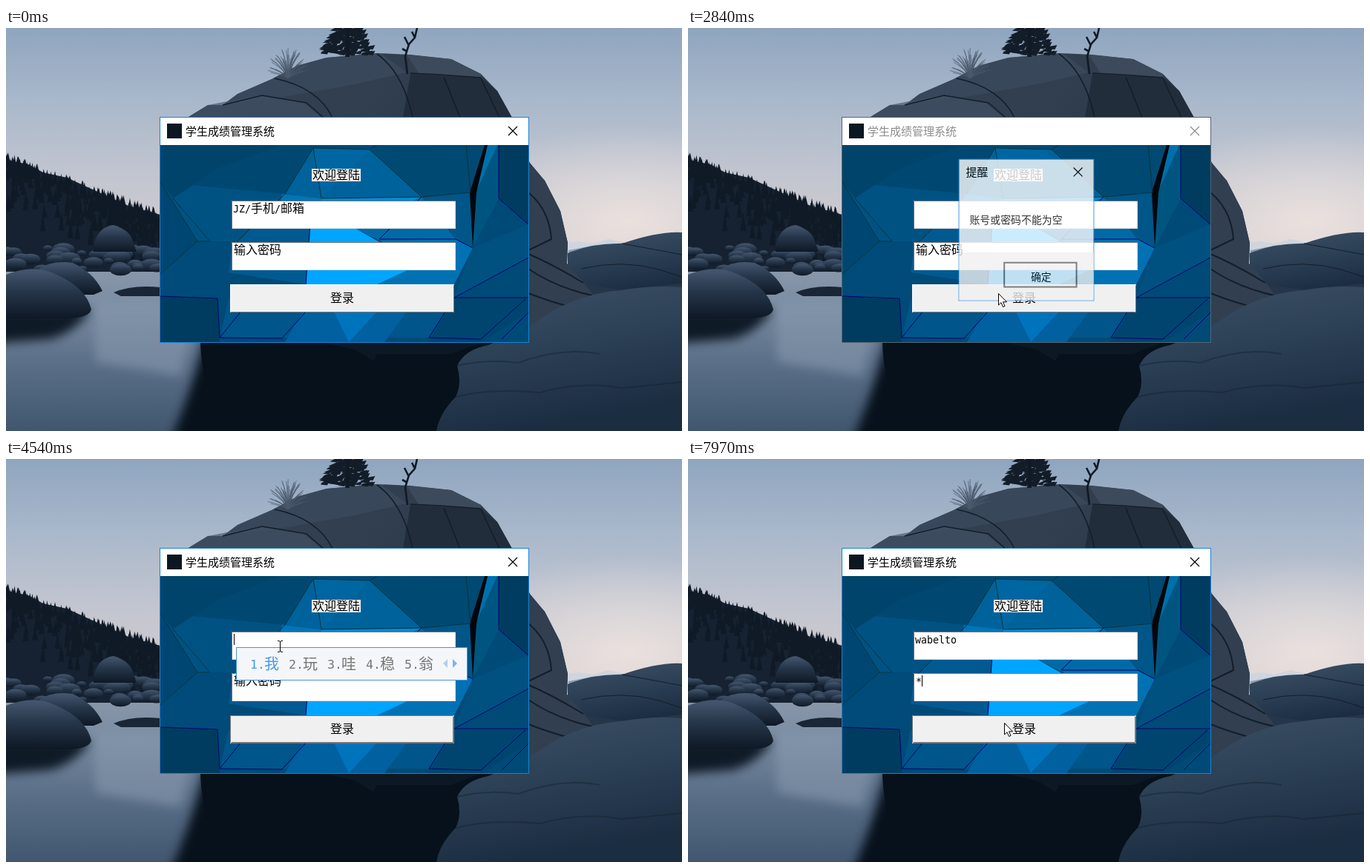
An HTML page for the animation above (8000 ms loop, 911 by 544 pixels).

```html
<!DOCTYPE html>
<html lang="zh-CN">
<head>
<meta charset="utf-8">
<style>
html, body { margin: 0; width: 100%; height: 100%; overflow: hidden; background: #0a1520; }
svg { display: block; }
text { font-family: "Noto Sans CJK SC", "Noto Sans CJK", sans-serif; white-space: pre; }
.cell { font-size: 16px; }
.mono { font-family: "DejaVu Sans Mono", monospace; font-size: 13.29px; }
.crack { fill: none; stroke: #131e2a; stroke-linejoin: round; }
.edge { fill: none; stroke: #00006e; stroke-width: 1; }
.dark { fill: none; stroke: #06343c; stroke-width: 1; }
</style>
</head>
<body>
<svg width="911" height="544" viewBox="0 0 911 544">
<defs>
  <linearGradient id="sky" x2="0" y2="1">
    <stop offset="0" stop-color="#8fa5bf"/><stop offset=".3" stop-color="#a9b8cb"/>
    <stop offset=".62" stop-color="#c3c6d0"/><stop offset="1" stop-color="#d6cccd"/>
  </linearGradient>
  <radialGradient id="dawn">
    <stop offset="0" stop-color="#f2e7e2" stop-opacity=".8"/><stop offset="1" stop-color="#f2e7e2" stop-opacity="0"/>
  </radialGradient>
  <linearGradient id="water" x2="0" y2="1">
    <stop offset="0" stop-color="#8896a9"/><stop offset=".2" stop-color="#7b8da3"/>
    <stop offset=".55" stop-color="#5c7089"/><stop offset="1" stop-color="#41566f"/>
  </linearGradient>
  <linearGradient id="rock" x2="1" y2=".6">
    <stop offset="0" stop-color="#344254"/><stop offset=".45" stop-color="#303e4f"/>
    <stop offset=".75" stop-color="#263342"/><stop offset="1" stop-color="#344356"/>
  </linearGradient>
  <linearGradient id="near" x2=".3" y2="1">
    <stop offset="0" stop-color="#3d5066"/><stop offset=".5" stop-color="#2c4056"/><stop offset="1" stop-color="#1b2d41"/>
  </linearGradient>
  <linearGradient id="shore" x2="0" y2="1">
    <stop offset="0" stop-color="#465870"/><stop offset=".45" stop-color="#26364a"/><stop offset="1" stop-color="#0e1825"/>
  </linearGradient>
  <filter id="soft" x="-30%" y="-30%" width="160%" height="160%" color-interpolation-filters="sRGB">
    <feGaussianBlur stdDeviation="7"/>
  </filter>
  <clipPath id="client"><rect x="208" y="158" width="496" height="266"/></clipPath>
</defs>

<!-- landscape -->
<rect width="911" height="330" fill="url(#sky)"/>
<ellipse cx="840" cy="260" rx="260" ry="130" fill="url(#dawn)"/>
<path d="M755,290L772,288L790,291L812,285L834,290V304H755Z" fill="#cfd5df"/>
<path d="M758,300L790,294L834,290V310H758Z" fill="#8a9cb4"/>
<path d="M757,304Q790,290 830,291Q880,274 911,276V360H757Z" fill="url(#near)"/>
<path d="M775,325Q830,312 880,326L911,336M830,291Q880,300 911,306" class="crack"/>
<path d="M780,345Q800,350 830,353L911,345V370H780Z" fill="#26364a"/>
<path d="M0,178L30,184L50,195L82,202L130,224L165,240L208,252V330H0Z" fill="#162231"/>
<path id="pines" fill="#101a27"/>
<rect y="329" width="640" height="215" fill="url(#water)"/>
<path d="M120,370H260L235,470L120,450Z" fill="#8799ae" opacity=".6" filter="url(#soft)"/>
<g id="stones" fill="url(#shore)"/>
<path d="M118,292Q125,268 145,266Q165,272 170,285L176,302H118Z" fill="url(#shore)"/>
<path d="M45,325Q62,313 90,317Q118,330 130,355L118,360H60Z" fill="url(#shore)"/>
<path d="M145,357Q170,346 208,350V362H155Z" fill="#1a2636"/>
<path d="M-20,380H114Q95,410 60,420L-20,426Z" fill="#0f1a27" filter="url(#soft)"/>
<path d="M0,333Q38,318 66,332Q108,350 115,380Q112,392 80,392H0Z" fill="url(#shore)"/>
<path d="M272,400H640V580H212Q252,490 272,400Z" fill="#07111b" filter="url(#soft)"/>
<path d="M262,422H660V470L600,520L585,544H290Q262,470 262,422Z" fill="#07111b"/>
<path d="M430,425H640L600,440H500L495,449L470,434Z" fill="#0c1824"/>
<path d="M208,140L246,120L272,104L292,104L312,89L358,69L392,51L432,40L500,34L545,36L600,42L640,62L662,85L682,121L706,182L726,206L747,247L757,290L756,318L778,343L792,362L770,378L704,402L640,425H262Z" fill="url(#rock)"/>
<path d="M292,104L312,89L358,69L392,51L432,40L505,34L540,60L470,76L380,92Z" fill="#3c4c60" opacity=".65"/>
<path d="M246,120L272,104L340,91L400,100L425,121Z" fill="#435266" opacity=".65"/>
<path d="M540,36L600,42L640,62V67L556,61Z" fill="#3c4a5b"/>
<path d="M545,62L640,67L662,85L682,121H535Z" fill="#212d3b"/>
<path d="M545,61L585,63L640,67M292,104L345,91L405,101L428,121M362,68Q420,80 440,121M500,35Q535,60 548,121M590,66L612,121M640,68L665,121" class="crack" stroke-width="1.6"/>
<path d="M704,182L726,206L747,247L757,290L756,318L778,343L792,362L770,378L704,402Z" fill="#313f51"/>
<path d="M704,222Q732,245 735,285L704,300M704,305Q735,318 778,344M704,325Q740,350 790,361M704,358Q740,372 768,378" class="crack" stroke-width="2"/>
<path d="M580,544Q584,520 606,498Q615,480 608,456Q618,434 650,428Q705,405 735,383Q780,357 830,354Q870,347 911,350V544Z" fill="url(#near)"/>
<path d="M608,456Q650,446 690,452Q750,430 800,440M606,498Q650,486 720,492Q780,476 830,486L911,478" class="crack" stroke-width="2" opacity=".4"/>
<path id="crown" fill="#121d29"/>
<path d="M457,39L459,0H462L463,39Z" fill="#101a25"/>
<path id="bush" fill="none" stroke="#4b5a6c" stroke-width=".7"/>
<path d="M541,62L538,38L543,22L551,13L554,0M543,24L537,12M541,32L534,28M551,13L547,5" fill="none" stroke="#101a26" stroke-width="2.6"/>

<!-- login window -->
<rect x="208" y="121" width="496" height="303" fill="#004a78"/>
<g clip-path="url(#client)">
  <path d="M208,158H420L376,224L208,208Z" fill="#004871"/>
  <path d="M208,208L376,224L305,295L258,288Z" fill="#005283"/>
  <path d="M208,158H370L285,190L225,230L208,208Z" fill="#00446b"/>
  <path d="M208,208L258,288L208,330Z" fill="#004672"/>
  <path d="M258,288H310L300,366L208,362V330Z" fill="#004b79"/>
  <path d="M208,362L285,365L288,424H208Z" fill="#003c60"/>
  <path d="M414,162L490,164L560,228L425,230L376,224Z" fill="#00629b"/>
  <path d="M414,162L490,164L425,230Z" fill="#0066a1"/>
  <path d="M490,164L650,158L626,222L560,228Z" fill="#004972"/>
  <path d="M376,224L425,230L410,268L404,346L300,330L305,295Z" fill="#005a91"/>
  <path d="M372,224L425,230L412,250L370,240Z" fill="#0075b7"/>
  <path d="M425,230L560,228L505,287L470,270L410,268Z" fill="#0089d8"/>
  <path d="M410,268L470,270L505,290L545,325L500,348H404Z" fill="#00a5ff"/>
  <path d="M470,270L560,228L606,285L505,287Z" fill="#006aa7"/>
  <path d="M505,287L606,285L629,297L604,346H500L545,325Z" fill="#0072b4"/>
  <path d="M560,228L626,222L629,297L606,285Z" fill="#005688"/>
  <path d="M629,297L704,265V310L604,364Z" fill="#005180"/>
  <path d="M604,364L704,310V424H570Z" fill="#004a77"/>
  <path d="M604,364H704V384L640,424H570Z" fill="#004570"/>
  <path d="M300,366H604L570,418L288,418Z" fill="#00558a"/>
  <path d="M400,383H540L510,424H376Z" fill="#0060a0"/>
  <path d="M442,383H500L462,424Z" fill="#0073bd"/>
  <path d="M664,158H704V265L664,230Z" fill="#003c60"/>
  <path d="M649,158H664V230L629,297L632,222Z" fill="#005580"/>
  <path d="M649,158H662L634,220Z" fill="#0070ad"/>
  <path d="M645,158H649L634,222L629,297L625,222Z" fill="#02070c"/>
  <path d="M208,208L258,288L208,332M258,288H275L225,230M414,162L376,224L305,295M414,162L490,164L560,228L626,222L620,158M414,162L425,230L560,228M490,164L500,158" class="dark"/>
  <path d="M664,158V230L704,265M629,297L606,285H503L560,228M604,364L704,310M604,364H704M570,418L604,364M208,362L285,365L288,418L372,419L404,383M288,418L330,366M570,418L640,420L700,366M668,420L704,384M411,250L404,346" class="edge"/>
</g>
<rect x="208" y="121" width="496" height="37" fill="#fff"/>
<rect id="frame" x="207.5" y="120.5" width="497" height="304" fill="none"/>
<rect x="217" y="129" width="20" height="20" fill="#0d1722"/>
<g id="caption">
  <text x="242" y="145" font-size="15">学生成绩管理系统</text>
  <path d="M677,133L689,145M689,133L677,145" stroke="#000" stroke-width="1.2"/>
</g>
<rect x="412" y="190" width="66" height="17" fill="#f0f0f0"/>
<text class="cell" x="413" y="204">欢迎登陆</text>
<g id="fields"></g>
<text id="user" class="cell" x="306" y="249"></text>
<text id="pass" class="cell" x="307" y="305"></text>
<rect id="caret" width="1" height="15"/>
<rect x="302" y="346" width="302" height="38" fill="#f0f0f0"/>
<path d="M302.5,383V346.5H603" fill="none" stroke="#fff"/>
<path d="M303,383.5H603.5V347" fill="none" stroke="#777"/>
<path id="bevel" d="M302.5,383V346.5H603M304,382.5H602.5V348" fill="none" stroke="#7b7b7b"/>
<text class="cell" x="437" y="370">登录</text>

<!-- candidate list -->
<g id="ime">
  <rect x="310.5" y="254.5" width="311" height="44" fill="#f5f6f9" stroke="#3e97e8"/>
  <g id="words"></g>
  <path d="M595,270V282L589,276Z" fill="#b5cfea"/>
  <path d="M602,270V282L608,276Z" fill="#76b5ef"/>
</g>

<!-- alert -->
<g id="alert">
  <rect x="364.5" y="176.5" width="183" height="192" fill="#fff" stroke="#1883d7"/>
  <rect x="365" y="303" width="182" height="65" fill="#f0f0f0"/>
  <text x="374" y="200" font-size="15">提醒</text>
  <path d="M520,188L532,200M532,188L520,200" stroke="#000" stroke-width="1.2"/>
  <text x="379" y="264" font-size="14">账号或密码不能为空</text>
  <rect x="426" y="317" width="98" height="33" fill="#f0f0f0" stroke="#606060" stroke-width="2"/>
  <text x="462" y="341" font-size="14">确定</text>
</g>

<circle id="glow" r="15" fill="#ffff40" opacity=".68"/>
<path id="beam" d="M-3,-7.5H-1L.5,-6.5L2,-7.5H4M.5,-7V7M-3,7.5H-1L.5,6.5L2,7.5H4" fill="none" stroke="#000"/>
<path id="arrow" d="M.5,.5V16L4,12.7L6.6,18.5L9,17.4L6.5,11.8H11.5Z" fill="#fff" stroke="#000"/>
</svg>

<script>
const $ = id => document.getElementById(id);
const show = (id, on) => $(id).style.display = on ? '' : 'none';
const move = (id, x, y) => $(id).setAttribute('transform', `translate(${x},${y})`);

let seed = 7;
const rnd = () => (seed = seed * 16807 % 2147483647) / 2147483647;

function plant() {
  let pines = '', stones = '', crown = '', bush = '';
  for (let i = 0; i < 260; i++) {
    const x = rnd() * 208, top = 167 + x * .37 + rnd() * rnd() * 75, h = 14 + rnd() * 12;
    pines += `M${x},${top}l4,${h}h-8Z`;
  }
  for (let i = 0; i < 40; i++) {
    const x = rnd() * 208, y = 297 + i * .75, r = 6 + rnd() * 10;
    stones += `<ellipse cx="${x}" cy="${y}" rx="${r}" ry="${r * .55}"/>`;
  }
  for (let i = 0; i < 130; i++) {
    const y = rnd() * 34, w = 17 + y * .5;
    crown += `M${457 + (rnd() * 2 - 1) * w},${y}l${4 + rnd() * 7},-2l-3,6l-9,-1Z`;
  }
  for (let i = 0; i < 60; i++) {
    const a = Math.PI * (1.08 + rnd() * .84), r = 16 + rnd() * 16;
    bush += `M380,68q${Math.cos(a) * r * .3},${Math.sin(a) * r * .8} ${Math.cos(a) * r},${Math.sin(a) * r * 1.3}`;
  }
  $('pines').setAttribute('d', pines);
  $('stones').innerHTML = stones;
  $('crown').setAttribute('d', crown);
  $('bush').setAttribute('d', bush);
  $('fields').innerHTML = [233, 289].map(y =>
    `<rect x="304" y="${y}" width="302" height="38" fill="#fff"/>
     <path d="M304.5,${y + 38}V${y + .5}H606" fill="none" stroke="#757575"/>
     <path d="M305,${y + 37.5}H605.5V${y + 1}" fill="none" stroke="#dedede"/>`).join('');
}

// Latin letters take half a cell, Chinese ones a whole cell
const cells = s => s.replace(/[ -~]+/g, m => `<tspan class="mono">${m}</tspan>`);
const candidates = s => [...s].map((c, i) => {
  const x = 329 + i * 52;
  return `<g fill="${i ? '#757575' : '#429be8'}"><text class="mono" x="${x}" y="283" style="font-size:16.6px">${i + 1}.</text>
    <text x="${x + 19}" y="284" font-size="20">${c}</text></g>`;
}).join('');

const NAME = 'wabelto', USER = 'JZ/手机/邮箱', PASS = '输入密码';
const userSteps = [[0, USER], [910, ''], [1450, USER], [1910, ''],
  ...[4630, 5090, 5720, 5870, 5950, 6100, 6270].map((t, i) => [t, NAME.slice(0, i + 1)])];
const passSteps = [[0, PASS], [1450, ''], [1910, PASS], [7120, ''], [7890, '*']];
const focusSteps = [[0, 0], [910, 1], [1450, 2], [1910, 1], [2690, 0], [4000, 1], [7120, 2]];
const clicks = [[910, 990], [1450, 1680], [1910, 1990], [2690, 2770], [3310, 3470], [4000, 4080], [7120, 7200]];
const route = [[70, 600, 444], [530, 385, 259], [990, 385, 259], [1430, 407, 315], [1680, 407, 315],
  [1890, 385, 259], [2060, 385, 259], [2370, 416, 353], [2440, 418, 358], [2840, 418, 358], [3300, 453, 327],
  [3470, 453, 327], [3820, 369, 253], [6690, 369, 253], [7060, 400, 308], [7200, 400, 308],
  [7410, 421, 340], [7790, 421, 340], [7950, 426, 356]];

const stepAt = (list, t) => list.filter(s => s[0] <= t).pop()[1];
const ramp = (t, a, b) => Math.min(1, Math.max(0, (t - a) / (b - a)));

function pointer(t) {
  const i = route.findIndex(p => p[0] > t);
  if (i < 1) return i ? route[route.length - 1].slice(1) : route[0].slice(1);
  const [a, x, y] = route[i - 1], [b, u, v] = route[i], k = ramp(t, a, b);
  return [Math.round(x + (u - x) * k), Math.round(y + (v - y) * k)];
}

const last = {};
function fill(id, html) {
  if (last[id] !== html) $(id).innerHTML = last[id] = html;
}

function draw(t) {
  const active = t < 2770 || t >= 3470;
  $('frame').setAttribute('stroke', active ? '#1883d7' : '#56656f');
  $('caption').setAttribute('opacity', active ? 1 : .45);
  show('bevel', active && t >= 910);

  const user = stepAt(userSteps, t), pass = stepAt(passSteps, t), focus = stepAt(focusSteps, t);
  fill('user', cells(user));
  fill('pass', cells(pass));
  show('caret', focus);
  move('caret', 307 + 8 * (focus == 1 ? user : pass).length, focus == 1 ? 236 : 292);

  show('ime', t >= 4540 && t < 5550);
  const second = t >= 5090;
  move('ime', second ? 16 : 0, 0);
  fill('words', candidates(second ? '挖哇娃瓦袜' : '我玩哇稳翁'));

  const fade = ramp(t, 2690, 2880) * (1 - ramp(t, 3400, 3700));
  const size = .97 + .03 * fade;
  show('alert', fade > 0);
  $('alert').setAttribute('opacity', fade);
  $('alert').setAttribute('transform', `translate(456,272.5) scale(${size}) translate(-456,-272.5)`);

  // the pointer is refreshed about thirteen times a second
  const [x, y] = pointer(70 + Math.floor((t - 70) / 76.7 + .03) * 76.7);
  const inField = x > 304 && x < 606 && (y > 233 && y < 271 || y > 289 && y < 327);
  const beam = inField && active && !(t >= 3470 && t < 3700);
  show('beam', beam && t >= 70 && !(t >= 5720 && t < 6580));
  show('arrow', !beam && t >= 70);
  move('beam', x, y);
  move('arrow', x, y);
  show('glow', clicks.some(([a, b]) => t >= a && t < b));
  move('glow', beam ? x - 2 : x, beam ? y - 1 : y);
}

plant();
const start = performance.now();
(function tick() {
  draw((performance.now() - start) % 8000);
  requestAnimationFrame(tick);
})();
</script>
</body>
</html>
```
